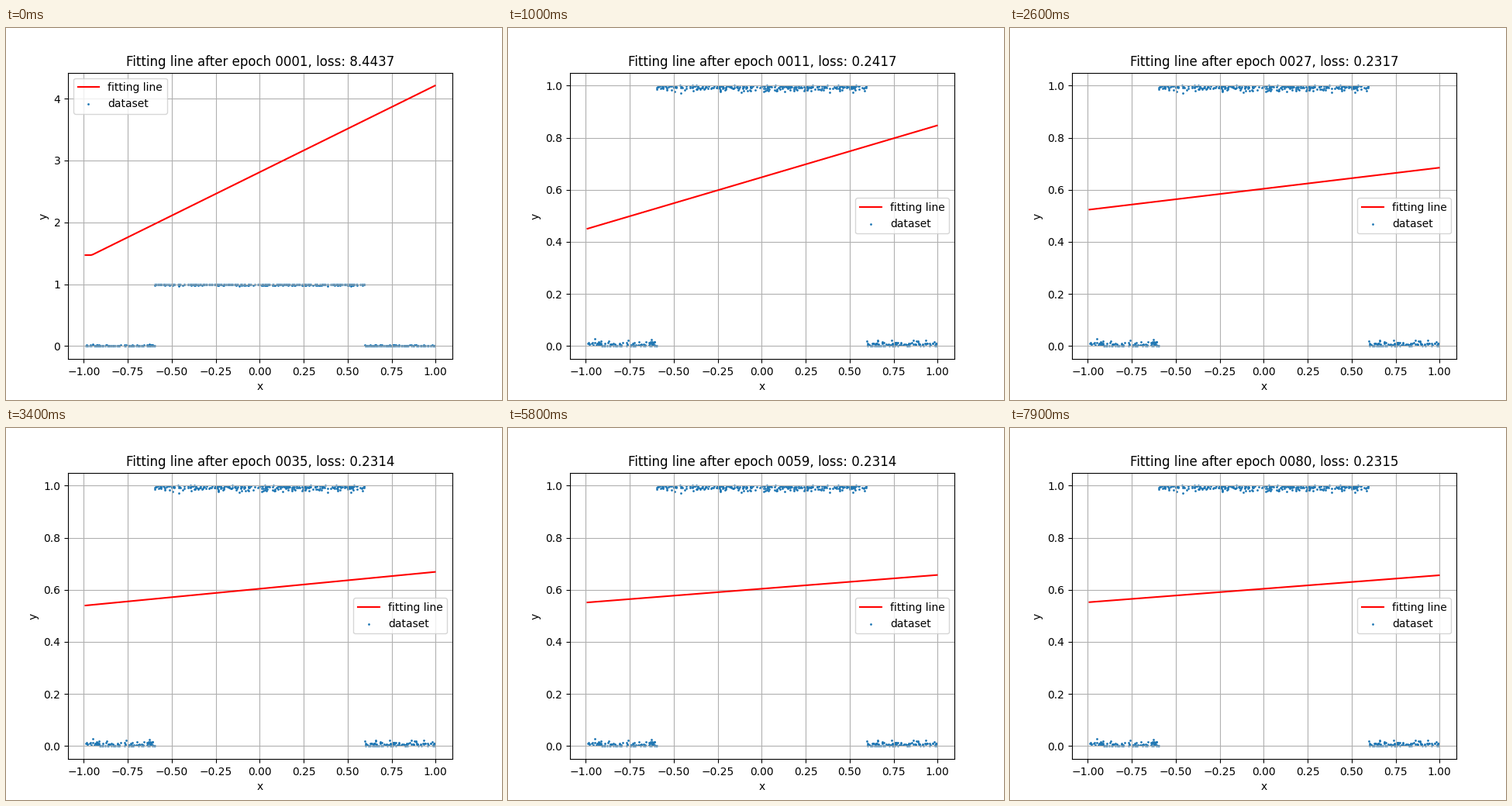
These frames come from a looping animation (640x480 px, 8000 ms). A matplotlib script:

```python
import matplotlib.pyplot as plt
import numpy as np
from matplotlib.animation import FuncAnimation

FRAMES, INTERVAL = 80, 100
X_MIN, X_MAX = -0.99, 0.9965


def make_data(n=500, seed=7):
    """Box function of x with one-sided noise that stays inside 0..1."""
    rng = np.random.default_rng(seed)
    x = np.concatenate(([X_MIN, X_MAX], rng.uniform(X_MIN, X_MAX, n - 2)))
    x.sort()
    noise = np.abs(rng.normal(0, 0.01, n))
    return x, np.where(np.abs(x) < 0.597, 1 - noise, noise)


def fit(k, x):
    """Settling line, flat left of a kink that drifts in and out again."""
    slope = 0.0518 + 0.39 * 0.905**k + 0.962 * 0.576**k
    bias = 0.604 + 2.207 * np.exp(-0.3674 * k - 0.0024 * k**2)
    kink = -0.855 - 0.1 * (k / 4 - 1) ** 2
    return bias + slope * np.maximum(x, kink)


def loss(k):
    """Fast and slow decay over a floor that creeps up."""
    return 0.231145 + 4e-6 * k + 8.17406 * 0.46206**k + 0.0385 * 0.842**k


X, Y = make_data()
fig, ax = plt.subplots(figsize=(6.4, 4.8), dpi=100)


def draw(k):
    ax.clear()
    line = fit(k, X)
    ax.plot(X, line, "r", label="fitting line")
    ax.scatter(X, Y, s=1, label="dataset")
    ax.set_title(f"Fitting line after epoch {k + 1:04d}, loss: {loss(k):.4f}")
    ax.set_xlabel("x")
    ax.set_ylabel("y")
    ax.grid(True)
    ax.legend(loc="upper left" if line.max() > 1.1 else "center right")


anim = FuncAnimation(fig, draw, frames=FRAMES, interval=INTERVAL,
                     repeat=True, repeat_delay=0)
plt.show()
```
